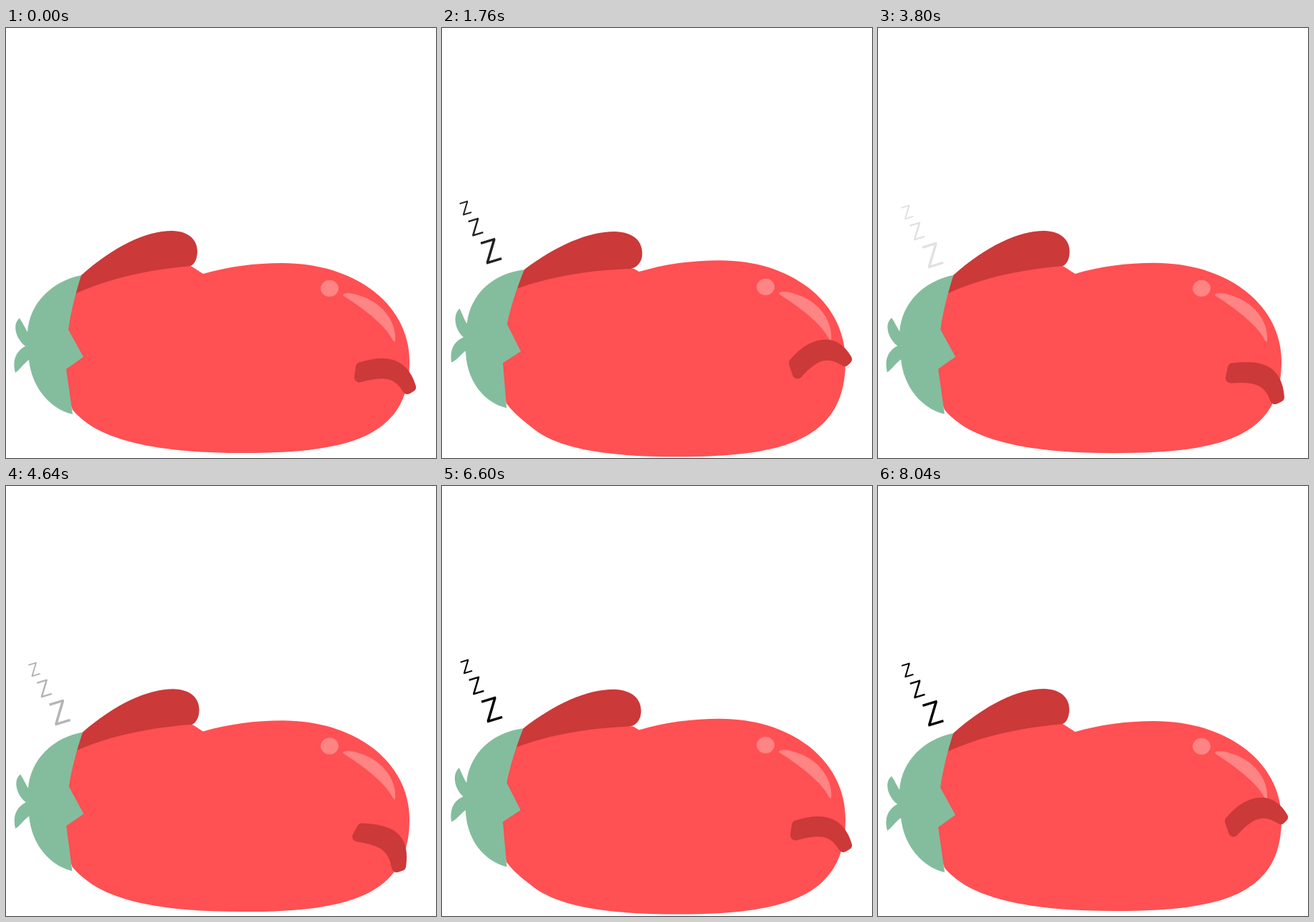
Animation of 600 by 600 pixels, one loop 8080 ms. Source, as an HTML page:

```html
<!DOCTYPE html>
<html lang="en">
<head>
<meta charset="utf-8">
<title>Sleeping pepper</title>
<style>
  html, body { margin: 0; width: 100%; height: 100%; overflow: hidden; background: #fff; }
  svg { display: block; width: 100vw; height: 100vh; }

  /* Breathing: half a breath each way */
  .breath { animation: 2020ms cubic-bezier(.37, 0, .63, 1) infinite alternate; }
  #arm { fill: #cb3939; animation-name: arm; }
  #body { fill: #ff5053; animation-name: body; }
  #leaf { fill: #83bd9e; animation-name: leaf; }
  #shine { fill: #ff8484; animation-name: shine; }
  #snore { animation-name: drift; }

  @keyframes arm { to { d: path("M98 368 L115 337 C160 303 205 284 241 284 C274 285 283 304 279 322 C275 333 267 337 255 337 L205 350 L115 364 Z"); } }
  @keyframes body { to { d: path("M98 366 C140 350 195 338 268 336 L275 340 C310 329 350 324 388 324 C490 324 563 384 563 465 C563 573 480 598.5 330 598.5 C240 598.5 168 590 130 561 C118 551 103 541 90 524 L72 462 Z"); } }
  @keyframes leaf { to { d: path("M115 337 C72 342 40 370 35 412 C32 408 28 398 25 391 C16 398 16 418 30 431 C16 437 11 449 13 466 C20 464 25 456 33 450 C34 492 58 522 90 530 L85 467 L110 451 L91 413 C95 392 104 365 115 337 Z"); } }
  @keyframes shine { to { transform: translateY(-2.2px); } }
  @keyframes drift { to { transform: translate(-8.5px, -6px); } }

  #zs { font-family: "Open Sans", "Noto Sans", sans-serif; text-anchor: middle; animation: fade 8080ms linear infinite; }
  @keyframes fade {
    0%, 50% { opacity: 0; }
    25%, 75%, 100% { opacity: 1; }
  }

  #tail { fill: #cb3939; stroke: #cb3939; stroke-width: 14; stroke-linejoin: round; animation: wag 8080ms linear infinite; }
  @keyframes wag {
    0%, 42.08%, 81.68% { d: path("M495 473.5 C527 463 554 465 565 501 L560 504 C546 480 528 478 493 487.5 Z"); }
    5.45%, 87.13% {
      d: path("M494 472 C526 455 556 453 567 492 L563 495 C545 474 526 473 493 486.5 Z");
      animation-timing-function: cubic-bezier(.61, 1, .88, 1);
    }
    21.04%, 100% {
      d: path("M491 467.5 C515 439 546 430 565 462 L562 465 C541 451 522 453 496 482.5 Z");
      animation-timing-function: cubic-bezier(.12, 0, .39, 0);
    }
    36.63% { d: path("M494 472 C526 455 556 453 567 492 L563 495 C545 474 526 473 493 486.5 Z"); }
    47.03% {
      d: path("M495 474.5 C530 470 557 474 560 515 L554 518 C545 490 524 486 492 488.5 Z");
      animation-timing-function: cubic-bezier(.61, 1, .88, 1);
    }
    61.88% {
      d: path("M497 478 C530 481 558 486 550 532 L544 534 C540 502 520 495 490 489.5 Z");
      animation-timing-function: cubic-bezier(.12, 0, .39, 0);
    }
    76.73% { d: path("M495 474.5 C530 470 557 474 560 515 L554 518 C545 490 524 486 492 488.5 Z"); }
  }
</style>
</head>
<body>
<svg viewBox="0 0 600 600">
  <path id="arm" class="breath" d="M90 374 L105 345 C150 305 195 283 232 283 C262 284 270 303 266 320 C263 332 256 334 245 335 L200 350 L110 372 Z"/>
  <path id="body" class="breath" d="M90 374 C135 352 190 338 258 332 L275 343 C310 333 348 328 385 328 C490 328 563 388 563 465 C563 570 480 593 330 593 C234 593 164 582 120 556 C109.5 549 100 541.5 93 533 L70 470 Z"/>
  <path id="leaf" class="breath" d="M105 345 C65 353 33 383 30 424 C27 419 23 411 19 405 C9 412 12 432 27 444 C12 452 9 466 13 481 C18 478 25 468 32 463 C36 502 62 532 93 539 L84 476 L108 459 L87 421 C90 398 97 370 105 345 Z"/>
  <g id="shine" class="breath">
    <ellipse cx="451.5" cy="363.3" rx="12.5" ry="11.5"/>
    <path d="M470 373 C470 369 482 369 492 373 C522 381 546 408 543 438 L540 436 C530 416 505 396 473 375 Z"/>
  </g>
  <path id="tail" d="M495 473.5 C527 463 554 465 565 501 L560 504 C546 480 528 478 493 487.5 Z"/>
  <g id="snore" class="breath">
    <g id="zs">
      <text transform="translate(76.5 317) rotate(-17)" font-size="45" dy=".357em">Z</text>
      <text transform="translate(55 283.5) rotate(-17)" font-size="32" dy=".357em">Z</text>
      <text transform="translate(41 257) rotate(-17)" font-size="25.5" dy=".357em">Z</text>
    </g>
  </g>
</svg>
</body>
</html>
```
